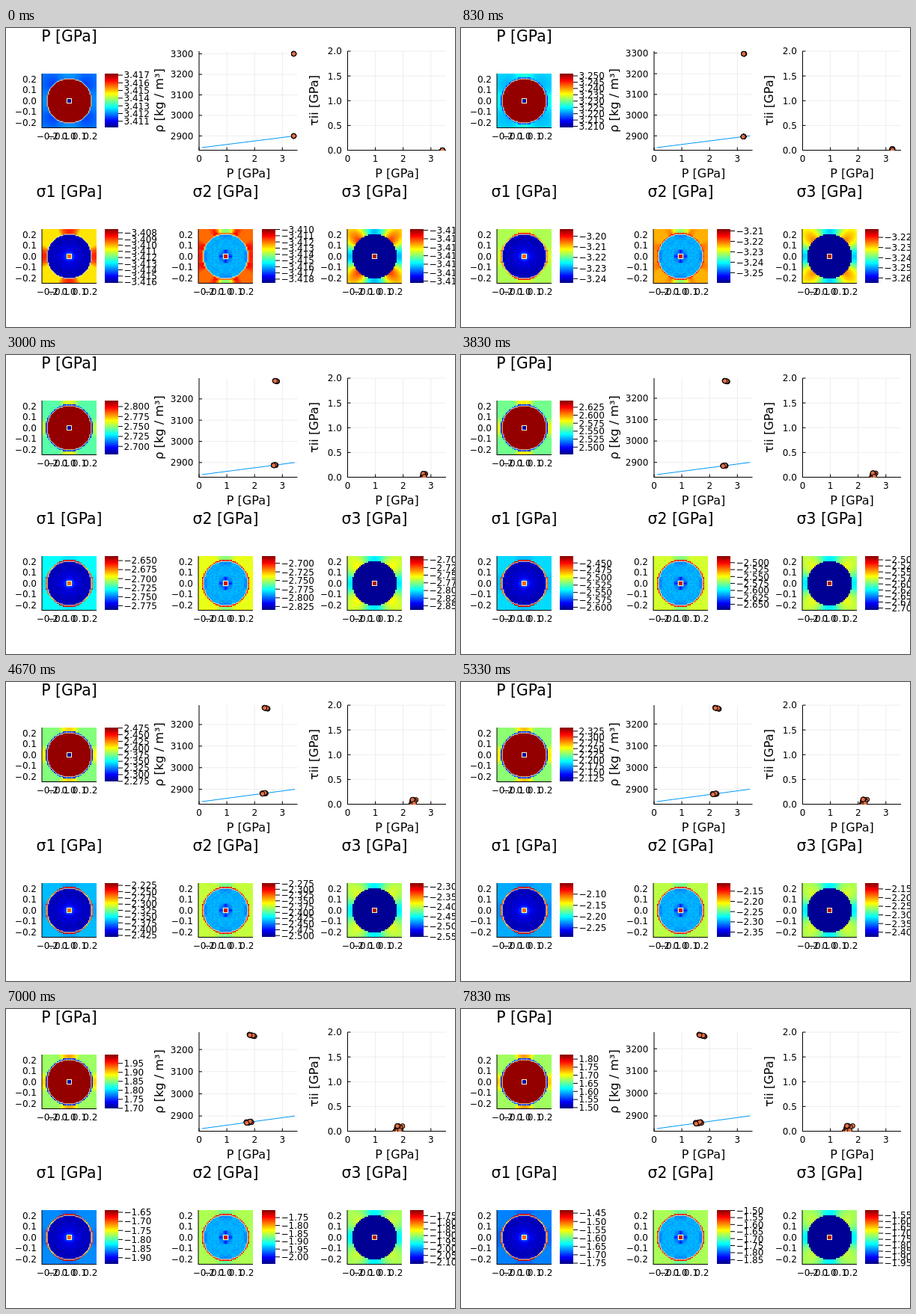
Write an HTML page with a canvas that moves like this. It is 600 px wide and 400 px high and loops after 8 s.

```html
<!DOCTYPE html>
<html lang="en">
<head>
<meta charset="utf-8">
<title>Pressure and stress</title>
<style>
html, body { margin: 0; width: 100%; height: 100%; overflow: hidden; background: #fff; }
canvas { display: block; width: 600px; height: 400px; }
</style>
</head>
<body>
<canvas id="stage" width="600" height="400"></canvas>
<script>
const ctx = document.getElementById('stage').getContext('2d');
const FONT = '"DejaVu Sans", sans-serif';
const STEPS = 48, LOOP = 8000;
const GRID = 41, SIZE = 73, CELL = 0.5 / GRID, MID = (GRID - 1) / 2;
const DISC = 0.203, HOLE = 0.018;
const KEYS = [0, 5, 12, 18, 28, 36, 47];

const clamp = (v, a = 0, b = 1) => Math.min(b, Math.max(a, v));
const mix = (a, b, t) => a + (b - a) * t;
const hash = (a, b) => {
  const s = Math.sin(a * 127.1 + b * 311.7) * 43758.5453;
  return s - Math.floor(s);
};
const jet = v => [3, 2, 1].map(c => Math.round(255 * clamp(1.5 - Math.abs(4 * clamp(v) - c))));

function at(values, n) {
  let i = 0;
  while (i < KEYS.length - 2 && n > KEYS[i + 1]) i++;
  return mix(values[i], values[i + 1], (n - KEYS[i]) / (KEYS[i + 1] - KEYS[i]));
}

// Each field returns a level 0..1 on the colour scale.
// q: radius, angle lobes, cell noise, decay over time and ring strength.
const fields = {
  P(q) {
    if (q.hole) return 0.03;
    if (q.disc) return 0.98;
    if (q.ring) return mix(q.base, 0.1 + 0.16 * q.noise, q.grow);
    const lobe = q.axis * (0.03 + 0.16 * (1 - q.fade(20))) * (q.vertical ? 1.1 : 0.8);
    return q.base + lobe - 0.06 * q.fade(10) * q.diagonal * q.near;
  },
  s1(q) {
    if (q.hole) return 0.78;
    if (q.disc) return 0.03 + 0.04 * q.noise + 0.1 * Math.exp(-q.r / 0.07) + 0.4 * Math.exp(-q.r / 0.018);
    const lobe = q.axis ** 0.7 * (0.22 * q.fade(4) - 0.03);
    if (q.ring) return mix(q.base + lobe, (q.vertical ? 0.88 : 0.76) + 0.1 * q.noise - 0.1 * q.diagonal, q.grow);
    return q.base + lobe;
  },
  s2(q) {
    if (q.hole) return 0.92;
    if (q.disc) {
      const spot = Math.exp(-(((q.r - 0.04) / 0.018) ** 2));
      return 0.28 + 0.03 * q.noise - 0.2 * spot * (0.3 + 0.7 * q.axis) - 0.05 * q.axis * clamp((q.r - 0.15) / 0.05);
    }
    if (q.ring) return mix(q.base, 0.8 + 0.15 * q.noise, q.grow);
    const drop = q.vertical ? q.axis * (0.06 + 0.2 * q.fade(10)) : -0.08 * q.axis * q.fade(6);
    return q.base + 0.12 * q.fade(8) * q.side * q.near - drop;
  },
  s3(q) {
    if (q.hole) return 0.95;
    if (q.disc) return 0.02;
    return q.base + (0.07 + 0.22 * q.fade(14)) * q.diagonal * (0.5 + 0.5 * q.near)
      - q.axis * (0.12 + 0.1 * q.fade(14));
  }
};

// base: final level, first level, decay in steps
const panels = [
  { title: 'P [GPa]', x: 48, y: 61, bar: 132, field: fields.P, base: [0.54, 0.24, 13], outline: true,
    hi: [3.41715, 3.2515, 3.0158, 2.814, 2.4752, 2.202, 1.8256],
    lo: [3.4102, 3.2092, 2.925, 2.68, 2.2748, 1.945, 1.4953] },
  { title: 'σ1 [GPa]', x: 48, y: 269, bar: 132, field: fields.s1, base: [0.22, 0.65, 18], outline: true,
    hi: [-3.40746, -3.1936, -2.8933, -2.6385, -2.2175, -1.887, -1.434],
    lo: [-3.4161, -3.2439, -2.9997, -2.7865, -2.431, -2.15, -1.754] },
  { title: 'σ2 [GPa]', x: 257, y: 269, bar: 342, field: fields.s2, base: [0.53, 0.77, 15], outline: true,
    hi: [-3.40999, -3.2086, -2.9249, -2.6804, -2.2749, -1.9499, -1.4999],
    lo: [-3.4186, -3.2597, -3.033, -2.8348, -2.5055, -2.241, -1.8795] },
  { title: 'σ3 [GPa]', x: 456, y: 269, bar: 540, field: fields.s3, base: [0.49, 0.53, 18],
    hi: [-3.4109, -3.2122, -2.9306, -2.689, -2.283, -1.9535, -1.509],
    lo: [-3.4172, -3.2648, -3.0506, -2.863, -2.552, -2.3015, -1.956] }
];

function text(s, x, y, size = 12, align = 'center') {
  ctx.font = `${size}px ${FONT}`;
  ctx.textAlign = align;
  ctx.fillStyle = '#000';
  ctx.fillText(s, x, y + size * 0.365);
}

function line(x1, y1, x2, y2, color = '#000', width = 1) {
  ctx.strokeStyle = color;
  ctx.lineWidth = width;
  ctx.beginPath();
  ctx.moveTo(x1, y1);
  ctx.lineTo(x2, y2);
  ctx.stroke();
}

const label = (v, digits) => (v < 0 ? '−' : '') + Math.abs(v).toFixed(digits);

function tickStep(range) {
  for (let p = -4; p < 1; p++) {
    for (const m of [1, 2.5, 5]) {
      const step = m * 10 ** p;
      if (range / step < 9.5) return [step, -p + (m === 2.5 ? 1 : 0)];
    }
  }
  return [1, 0];
}

// Closed outline through the edges between cells inside and outside a radius.
function outline(radius) {
  const pts = [];
  const inside = (i, j) => Math.hypot(i - MID, j - MID) * CELL < radius;
  for (let j = 0; j < GRID; j++) for (let i = 0; i < GRID; i++) {
    if (inside(i, j) !== inside(i + 1, j)) pts.push([i + 1, j + 0.5]);
    if (inside(i, j) !== inside(i, j + 1)) pts.push([i + 0.5, j + 1]);
  }
  const angle = p => Math.atan2(p[1] - GRID / 2, p[0] - GRID / 2);
  return pts.sort((a, b) => angle(a) - angle(b));
}
const discEdge = outline(DISC);

function drawOutline(pts, x, y) {
  ctx.beginPath();
  for (const [i, j] of pts) ctx.lineTo(x + i * SIZE / GRID, y + j * SIZE / GRID);
  ctx.closePath();
  ctx.stroke();
}

const tile = document.createElement('canvas');
tile.width = tile.height = GRID;
const tileCtx = tile.getContext('2d');
const pixels = tileCtx.createImageData(GRID, GRID);

function drawField(p, n) {
  const [end, start, rate] = p.base;
  const fade = k => Math.exp(-n / k);
  const base = mix(end, start, fade(rate)), grow = 1 - fade(3);
  for (let j = 0; j < GRID; j++) for (let i = 0; i < GRID; i++) {
    const dx = (i - MID) * CELL, dy = (j - MID) * CELL;
    const r = Math.hypot(dx, dy), a = Math.atan2(dy, dx);
    const v = p.field({
      r, base, grow, fade,
      noise: hash(Math.abs(i - MID), Math.abs(j - MID)),
      near: clamp(1 - (r - DISC) / 0.13),
      hole: r < HOLE, disc: r < DISC, ring: r < DISC + CELL,
      axis: Math.max(0, Math.cos(4 * a)),
      diagonal: Math.max(0, -Math.cos(4 * a)),
      side: Math.max(0, -Math.cos(8 * a)),
      vertical: Math.abs(dy) > Math.abs(dx)
    });
    pixels.data.set([...jet(v), 255], 4 * (j * GRID + i));
  }
  tileCtx.putImageData(pixels, 0, 0);
  ctx.imageSmoothingEnabled = false;
  ctx.drawImage(tile, p.x, p.y, SIZE, SIZE);
  ctx.strokeStyle = '#f8fbc0';
  ctx.lineWidth = 1;
  if (p.outline) drawOutline(discEdge, p.x, p.y);
  ctx.strokeRect(p.x + SIZE / 2 - 3, p.y + SIZE / 2 - 3, 6, 6);
}

function drawPanel(p, n) {
  const { x, y, bar } = p, cx = x + SIZE / 2, cy = y + SIZE / 2;
  text(p.title, cx, y - 50.3, 20.4);
  drawField(p, n);
  line(x, y, x, y + SIZE);
  line(x, y + SIZE - 0.5, x + SIZE, y + SIZE - 0.5);
  for (let k = -2; k <= 2; k++) {
    const s = label(k / 10, 1);
    text(s, x - 7, cy - k * 14.4, 12, 'right');
    text(s, cx + k * 14.4 - 0.5, y + 84);
  }

  const grad = ctx.createLinearGradient(0, y, 0, y + 72);
  for (let k = 0; k <= 8; k++) grad.addColorStop(k / 8, `rgb(${jet(1 - k / 8)})`);
  ctx.fillStyle = grad;
  ctx.fillRect(bar, y, 18, 72);

  const hi = at(p.hi, n), lo = at(p.lo, n);
  const [step, digits] = tickStep(hi - lo);
  const slack = (hi - lo) * 0.004;
  for (let k = Math.ceil((lo - slack) / step); k * step <= hi + slack; k++) {
    const ty = y + 0.5 + 71.4 * (hi - k * step) / (hi - lo);
    line(bar + 18, ty, bar + 24, ty);
    text(label(k * step, digits), bar + 25.5, ty, 12, 'left');
  }
}

// Plot frame shared by the two scatter charts; yTicks holds [label, y].
const TOP = 31, BOTTOM = 163.5, UNIT = 37.1, WIDTH = 131.5, TICK = 4;
function drawAxes(x, yTicks, name, nameX) {
  for (let k = 0; k <= 3; k++) {
    const tx = x + k * UNIT;
    line(tx, TOP, tx, BOTTOM, '#ededed');
    text(String(k), tx, 174.8);
  }
  for (const [s, ty] of yTicks) {
    line(x, ty, x + WIDTH, ty, '#ededed');
    text(s, x - 7.7, ty, 12, 'right');
  }
  for (let k = 0; k <= 3; k++) line(x + k * UNIT, BOTTOM, x + k * UNIT, BOTTOM - TICK);
  for (const [, ty] of yTicks) line(x, ty, x + TICK, ty);
  line(x, TOP, x, BOTTOM + 0.5);
  line(x, BOTTOM, x + WIDTH, BOTTOM);
  text('P [GPa]', x + 66, 194.3, 16);
  ctx.save();
  ctx.translate(nameX, 97);
  ctx.rotate(-Math.PI / 2);
  text(name, 0, 0, 16.2);
  ctx.restore();
}

function dot(x, y) {
  ctx.beginPath();
  ctx.arc(x, y, 3.1, 0, 7);
  ctx.fillStyle = '#e26f46';
  ctx.fill();
  ctx.strokeStyle = '#000';
  ctx.lineWidth = 1;
  ctx.stroke();
}

function clipped(x, draw) {
  ctx.save();
  ctx.beginPath();
  ctx.rect(x, TOP - 1, WIDTH, BOTTOM - TOP + 1.5);
  ctx.clip();
  draw();
  ctx.restore();
}

function drawDensity(n, lo, range) {
  const x = 258, max = 3300 - 0.81 * n, min = 2843;
  const py = rho => 160 - 125.4 * (rho - min) / (max - min);
  const px = P => x + P * UNIT;
  const ticks = [];
  for (let rho = 2900; rho <= 3300; rho += 100) {
    if (py(rho) >= TOP) ticks.push([String(rho), py(rho)]);
  }
  drawAxes(x, ticks, 'ρ [kg / m³]', 204.5);
  clipped(x, () => {
    line(px(0.1), py(min), px(3.45), py(2900), '#009af9');
    for (let i = 0; i < 18; i++) {
      const u = i < 2 ? i : hash(i, 3);
      const jitter = (hash(i, 8) - 0.5) * 2.4 * n / 47;
      dot(px(lo + range * (0.38 + 0.62 * u)), 34.5 + 2 * u * n / 47 + jitter / 2);
      const P = lo + range * 0.64 * u;
      dot(px(P), py(min + 57 * (P - 0.1) / 3.35) + jitter);
    }
  });
}

function drawStress(n, lo, range) {
  const x = 456.5, scale = (BOTTOM - TOP) / 2;
  const ticks = [0, 0.5, 1, 1.5, 2].map(v => [v.toFixed(1), BOTTOM - v * scale]);
  drawAxes(x, ticks, 'τii [GPa]', 411.5);
  const peak = 0.13 * (1 - Math.exp(-n / 20));
  clipped(x, () => {
    for (let i = 0; i < 24; i++) {
      const u = hash(i, 5), v = i % 3 ? Math.sqrt(hash(i, 11)) : 0;
      const spread = v ? 0.2 + 0.8 * u : 0.65 * u;
      dot(x + (lo + range * spread) * UNIT, BOTTOM - peak * v * scale);
    }
  });
}

function render(ms) {
  const n = Math.floor((ms % LOOP + 3.4) * STEPS / LOOP) % STEPS;
  const lo = at(panels[0].lo, n), range = at(panels[0].hi, n) - lo;
  ctx.fillStyle = '#fff';
  ctx.fillRect(0, 0, 600, 400);
  for (const p of panels) drawPanel(p, n);
  drawDensity(n, lo, range);
  drawStress(n, lo, range);
}

const begin = performance.now();
function loop() {
  render(performance.now() - begin);
  requestAnimationFrame(loop);
}
loop();
</script>
</body>
</html>
```
